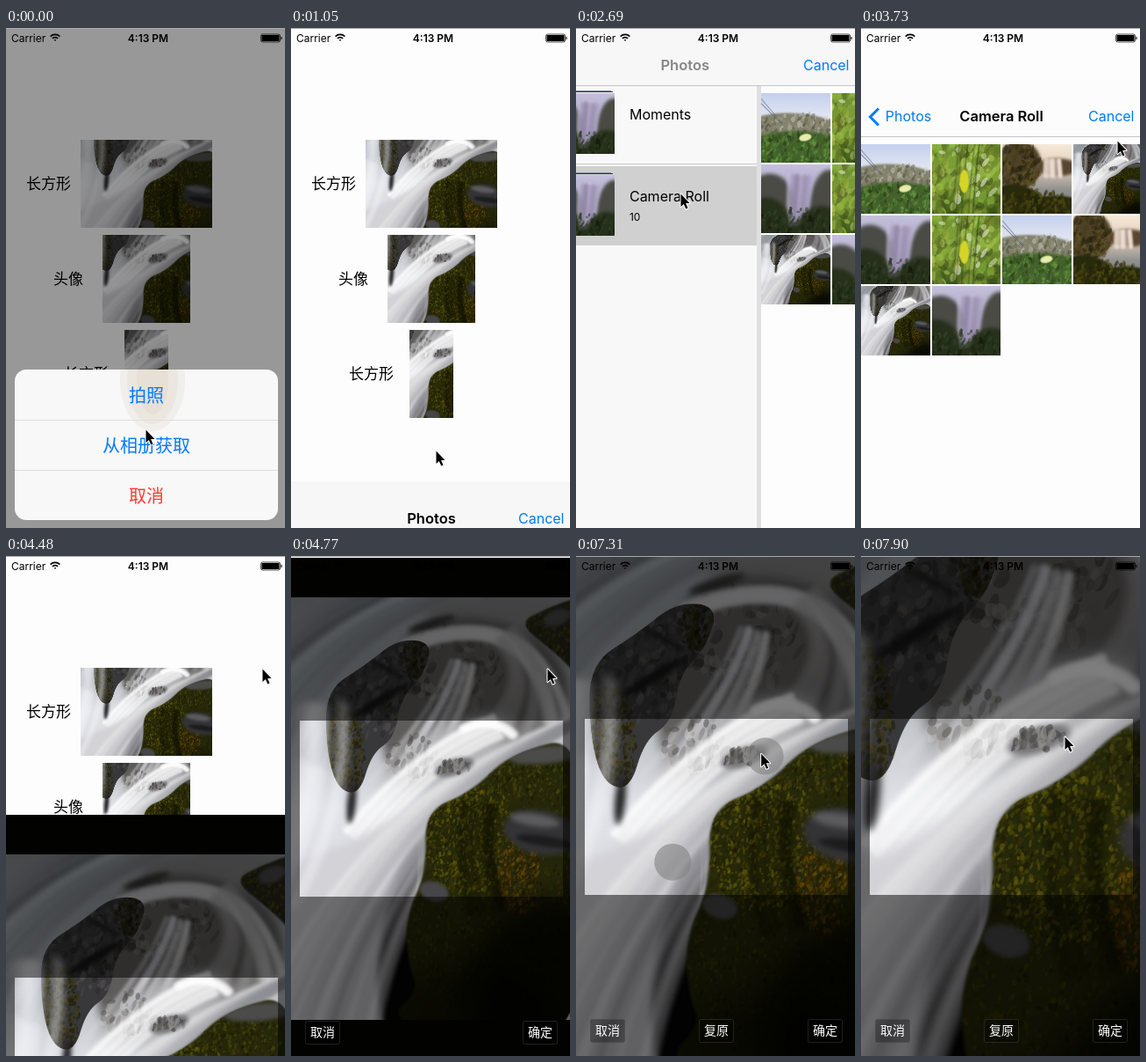
Write an HTML page with a canvas that moves like this. It is 318 by 568 pixels and loops after 8 s.

```html
<!DOCTYPE html>
<html lang="zh">
<head>
<meta charset="utf-8">
<style>
html, body { margin: 0; width: 100%; height: 100%; overflow: hidden; background: #fdfdfd; }
canvas { display: block; width: 318px; height: 568px; }
</style>
</head>
<body>
<canvas id="stage" width="318" height="568"></canvas>
<script>
const W = 318, H = 568, LOOP = 8000, BEAT = 149.2;
const ctx = document.getElementById('stage').getContext('2d');
const LATIN = 'Inter, "Open Sans", sans-serif';
const CJK = '"Noto Sans CJK SC", "Noto Sans CJK", sans-serif';
const BLUE = '#007aff', RED = '#ff3b30';

// ---------- painting ----------
function random(seed) {
  return () => (seed = seed * 16807 % 2147483647) / 2147483647;
}

// Soft brushes that share one seeded random source.
function brushes(g, seed) {
  const rnd = random(seed * 99991);
  const blurred = (blur, draw) => {
    g.filter = blur ? `blur(${blur}px)` : 'none';
    draw();
    g.filter = 'none';
  };
  const normal = (dx, dy) => [-dy / Math.hypot(dx, dy), dx / Math.hypot(dx, dy)];

  function backdrop(w, h, ...colors) {
    const fill = g.createLinearGradient(0, 0, 0, h);
    colors.forEach((c, i) => fill.addColorStop(i / (colors.length - 1), c));
    g.fillStyle = fill;
    g.fillRect(0, 0, w, h);
  }
  function oval(color, x, y, rx, ry, turn = 0, blur = 0) {
    g.fillStyle = color;
    g.beginPath();
    g.ellipse(x, y, rx, ry, turn, 0, 7);
    blurred(blur, () => g.fill());
  }
  // A smooth closed outline; details are clipped to it.
  function mass(color, points, blur, details) {
    g.save();
    g.beginPath();
    points.forEach(([x, y], i) => {
      const [nx, ny] = points[(i + 1) % points.length];
      if (!i) {
        const [px, py] = points[points.length - 1];
        g.moveTo((px + x) / 2, (py + y) / 2);
      }
      g.quadraticCurveTo(x, y, (x + nx) / 2, (y + ny) / 2);
    });
    g.fillStyle = color;
    blurred(blur, () => g.fill());
    if (details) {
      g.clip();
      details();
    }
    g.restore();
  }
  // Strands along a curve; the spread goes from s0 to s1.
  function flow(n, color, width, alpha, [x0, y0, cx, cy, x1, y1], s0, s1) {
    const [ax, ay] = normal(cx - x0, cy - y0), [bx, by] = normal(x1 - cx, y1 - cy);
    g.strokeStyle = color;
    g.lineCap = 'round';
    blurred(width * 0.6, () => {
      for (let i = 0; i < n; i++) {
        const k = rnd() * 2 - 1, m = k * (s0 + s1) / 4;
        g.globalAlpha = alpha * (0.4 + rnd() * 0.6);
        g.lineWidth = width * (0.3 + rnd());
        g.beginPath();
        g.moveTo(x0 + ax * k * s0, y0 + ay * k * s0);
        g.quadraticCurveTo(cx + (ax + bx) * m, cy + (ay + by) * m, x1 + bx * k * s1, y1 + by * k * s1);
        g.stroke();
      }
    });
    g.globalAlpha = 1;
  }
  function speckle(n, x, y, rx, ry, [hue, sat, light], size) {
    g.globalAlpha = 0.5;
    for (let i = 0; i < n; i++) {
      const a = rnd() * 2 * Math.PI, r = Math.sqrt(rnd());
      g.fillStyle = `hsl(${hue + rnd() * 10 - 5} ${sat}% ${light * (0.4 + rnd() * 1.2)}%)`;
      g.beginPath();
      g.ellipse(x + rx * r * Math.cos(a), y + ry * r * Math.sin(a),
        size * (0.3 + rnd() * 0.5), size * (0.4 + rnd()), rnd() - 0.2, 0, 7);
      g.fill();
    }
    g.globalAlpha = 1;
  }
  return { backdrop, oval, mass, flow, speckle };
}

function picture(w, h, seed, paint) {
  const c = document.createElement('canvas');
  c.width = w * 2;
  c.height = h * 2;
  const g = c.getContext('2d');
  g.scale(2, 2);
  paint(brushes(g, seed), g);
  return c;
}

const MOSS = [55, 80, 13], STONE = [30, 3, 24];

const rapids = picture(W, 480, 7, ({ backdrop, oval, mass, flow, speckle }, g) => {
  backdrop(W, 480, '#8e9297', '#a6abb0', '#e2e3e8', '#d8d8dc', '#c2c2c6');
  g.translate(0, -45);
  const spray = [210, 30, 60, 70, -20, 200];
  flow(26, '#62686e', 12, 0.3, spray, 40, 80);
  flow(16, '#c8ced4', 9, 0.3, spray, 30, 80);
  oval('#858585', 240, 62, 90, 22, 0, 14);

  mass('#5e5c5b', [[110, 110], [165, 62], [270, 75], [320, 130], [310, 200], [200, 235], [100, 265]], 10);
  speckle(110, 185, 125, 55, 50, [30, 3, 32], 7);
  oval('#343332', 160, 75, 28, 5, -0.3, 6);
  flow(26, '#cfd0d2', 8, 0.3, [130, 100, 275, 45, 305, 185], 5, 14);
  flow(20, '#a5a4a4', 9, 0.3, [245, 88, 290, 130, 255, 200], 16, 36);
  flow(22, '#dddde1', 6, 0.38, [195, 120, 180, 180, 110, 270], 14, 28);
  oval('#b9b9bc', 180, 222, 80, 30, -0.4, 16);
  speckle(50, 140, 225, 32, 24, [30, 2, 52], 6);
  flow(24, '#ffffff', 6, 0.4, [235, 192, 150, 225, 75, 320], 14, 18);
  flow(8, '#ffffff', 7, 0.6, [196, 195, 228, 178, 254, 202], 3, 4);

  mass('#38383a', [[40, 150], [85, 122], [122, 92], [162, 96], [150, 135], [125, 160], [118, 205], [92, 222], [78, 270], [52, 262], [40, 215]], 0, () => {
    speckle(260, 95, 150, 60, 55, STONE, 5);
    speckle(420, 60, 225, 24, 55, [53, 80, 10], 2.5);
    speckle(120, 142, 115, 18, 22, [55, 60, 8], 3);
    oval('#151516', 100, 163, 36, 5, -0.55, 5);
    oval('#1d1d1d', 112, 128, 22, 3, 0.5, 4);
  });
  oval('#242426', 69, 278, 5, 24, 0.1, 6);

  oval('#040404', 145, 430, 48, 135, 0.1, 8);
  flow(6, '#8d8d92', 2, 0.6, [146, 312, 150, 345, 144, 380], 4, 3);
  mass('#d2d2d7', [[340, 172], [270, 215], [160, 268], [70, 325], [-40, 360], [-40, 570], [95, 570], [98, 440], [125, 345], [190, 282], [260, 228]], 9);
  const stream = [322, 188, 110, 285, 30, 540];
  flow(34, '#ffffff', 9, 0.32, stream, 3, 68);
  flow(28, '#8d8d94', 9, 0.26, stream, 3, 72);
  flow(12, '#f6f6fa', 14, 0.4, [32, 170, 40, 280, -20, 380], 30, 30);
  oval('#77777a', 186, 238, 23, 9, -0.3, 5);
  speckle(50, 186, 238, 20, 7, [30, 3, 40], 4);

  mass('#25270a', [[340, 200], [250, 222], [206, 266], [152, 288], [155, 355], [130, 410], [134, 465], [146, 490], [110, 525], [200, 550], [340, 550]], 2, () => {
    speckle(1700, 230, 370, 105, 165, [54, 80, 10], 2.4);
    speckle(900, 200, 315, 55, 68, [57, 80, 16], 2.2);
    speckle(260, 270, 250, 48, 24, [58, 65, 13], 2.4);
    speckle(320, 260, 360, 25, 45, [40, 88, 18], 2.4);
    flow(9, '#0c0d03', 6, 0.5, [215, 280, 205, 330, 225, 400], 28, 32);
    oval('#4b4b49', 290, 224, 42, 10, -0.1, 4);
    oval('#343436', 284, 312, 42, 25, 0.2, 6);
    oval('#5c5c5f', 278, 298, 28, 7, 0.15, 6);
    oval('#1c1c1d', 290, 322, 34, 6, 0.15, 5);
    oval('#464649', 163, 379, 17, 11, 0.3, 3);
    oval('rgba(0,0,0,.75)', 300, 490, 100, 105, 0.5, 40);
    oval('rgba(0,0,0,.5)', 200, 530, 100, 70, 0, 40);
  });

  mass('#26261c', [[258, 75], [290, 58], [340, 40], [340, 150], [305, 110]], 2, () => {
    speckle(160, 295, 90, 35, 45, MOSS, 3);
    oval('#48484a', 303, 68, 16, 9, -0.4, 4);
  });
});

const meadow = picture(78, 78, 11, ({ backdrop, oval, flow, speckle }) => {
  backdrop(78, 78, '#c5d0ee', '#eff0f4', '#f2f2f2');
  oval('#84836f', 42, 52, 68, 29, 0.1, 2);
  speckle(160, 42, 38, 50, 14, [60, 12, 50], 3);
  oval('#44612c', 40, 75, 75, 32, 0, 3);
  speckle(420, 40, 66, 60, 22, [95, 42, 30], 3);
  flow(2, '#555b63', 0.8, 1, [0, 6, 12, 20, 24, 34], 4, 1);
  oval('#e6edab', 50, 50, 7, 4, -0.2, 1);
});

const leaves = picture(78, 78, 29, ({ backdrop, oval, flow, speckle }) => {
  backdrop(78, 78, '#6d8b2d', '#819f36', '#3d5a18');
  speckle(220, 39, 39, 56, 56, [78, 50, 38], 8);
  speckle(60, 39, 39, 56, 56, [70, 50, 65], 5);
  flow(5, '#2d4017', 2, 0.9, [46, -5, 40, 40, 38, 83], 14, 14);
  oval('#d6d426', 37, 42, 5, 13, 0, 1);
});

const lake = picture(78, 78, 41, ({ backdrop, oval, flow, speckle }) => {
  backdrop(78, 78, '#f7ead9', '#e1cfbd', '#8f8f8d', '#77777b');
  oval('#4d4228', 18, 24, 26, 28, 0.3, 3);
  oval('#5a4630', 62, 26, 24, 10, 0, 3);
  speckle(170, 18, 24, 26, 26, [45, 45, 19], 4);
  flow(20, '#f7e8dc', 4, 0.7, [54, 18, 54, 26, 54, 36], 13, 15);
  oval('#282a0c', 15, 76, 40, 30, 0.2, 2);
  oval('#282a0c', 60, 78, 40, 20, 0, 2);
  speckle(260, 35, 72, 46, 20, [55, 60, 15], 3);
});

const cascade = picture(78, 78, 53, ({ backdrop, oval, flow, speckle }) => {
  backdrop(78, 78, '#c6c2dc', '#a9a3c0', '#6f667f');
  oval('#4a4b45', 10, 40, 26, 29, 0, 4);
  oval('#4a4b45', 72, 38, 16, 32, 0.2, 4);
  flow(26, '#cdc5de', 6, 0.4, [44, 12, 42, 35, 40, 58], 14, 11);
  flow(12, '#81769a', 5, 0.35, [44, 14, 42, 35, 40, 60], 15, 12);
  oval('#26301a', 5, 64, 27, 26, 0.4, 4);
  oval('#26301a', 66, 70, 25, 22, -0.4, 4);
  oval('#26301a', 38, 84, 50, 16, 0, 4);
  speckle(240, 39, 72, 50, 22, [90, 30, 14], 3);
});

// ---------- motion ----------
// Critically damped spring from 0 to 1, in beats.
function spring(b, start) {
  const x = 3 * Math.max(0, b - start);
  return 1 - (1 + x) * Math.exp(-x);
}
const ramp = (b, start, end) => Math.min(1, Math.max(0, (b - start) / (end - start)));

const TRIPS = [
  { from: 0, to: 2, x: 164, y: 479 },
  { from: 10, to: 14, x: 118, y: 187 },
  { from: 18, to: 21, x: 291, y: 127 },
  { from: 34, to: 38, x: 199, y: 233 },
  { from: 47, to: 53, x: 231, y: 204 }
];
function pointerAt(b) {
  let x = 158, y = 455;
  for (const trip of TRIPS) {
    const k = ramp(b, trip.from, trip.to);
    x += (trip.x - x) * k;
    y += (trip.y - y) * k;
  }
  return [x, y];
}

// ---------- interface ----------
function rect(color, x, y, w, h) {
  ctx.fillStyle = color;
  ctx.fillRect(x, y, w, h);
}
function disc(color, x, y, rx, ry = rx) {
  ctx.fillStyle = color;
  ctx.beginPath();
  ctx.ellipse(x, y, rx, ry, 0, 0, 7);
  ctx.fill();
}
function label(s, x, y, size, { color = '#000', align = 'left', weight = 400, family = LATIN, alpha = 1 } = {}) {
  ctx.globalAlpha = Math.max(0, alpha);
  ctx.font = `${weight} ${size}px ${family}`;
  ctx.fillStyle = color;
  ctx.textAlign = align;
  ctx.textBaseline = 'middle';
  ctx.fillText(s, x, y);
  ctx.globalAlpha = 1;
}
function shifted(x, y, draw) {
  ctx.save();
  ctx.translate(x, y);
  draw();
  ctx.restore();
}

function mainPage() {
  rect('#fdfdfd', 0, 0, W, H);
  [['长方形', 23, 150], ['头像', 54, 100], ['长方形', 66, 50]].forEach(([name, x, w], i) => {
    const y = 127 + i * 108;
    label(name, x, y + 50, 17, { family: CJK });
    ctx.drawImage(rapids, (160 - w) * 2, 280, w * 4, 400, 160 - w / 2, y, w, 100);
  });
}

function actionSheet(b) {
  const gone = spring(b, 3.6);
  rect(`rgba(0,0,0,${0.4 * (1 - gone)})`, 0, 0, W, H);
  shifted(0, gone * 185, () => {
    ctx.beginPath();
    ctx.roundRect(10, 388, 300, 171, 13);
    ctx.clip();
    rect('#f8f8f8', 10, 388, 300, 171);
    for (const r of [37, 29, 18]) disc('rgba(190,180,150,.13)', 167, 400, r, r + 21);
    if (b === 2 || b === 3) rect('rgba(0,0,0,.08)', 10, 445, 300, 57);
    ['拍照', '从相册获取', '取消'].forEach((s, i) => {
      const y = 388 + i * 57;
      if (i) rect('#dededf', 10, y, 300, 1);
      label(s, 160, y + 29, 20, { color: i < 2 ? BLUE : RED, align: 'center', family: CJK });
    });
  });
}

function albumList(selected) {
  rect('#f8f8f8', 0, 0, W, H);
  if (selected) rect('#d0d0d0', 0, 157, W, 90);
  rect('#c8c8cc', 0, 154, W, 1);
  ['Moments', 'Camera Roll'].forEach((name, i) => {
    const y = 74 + i * 93;
    rect('#7d8b9c', 12, y - 3, 60, 1);
    rect('#27343c', 10, y - 2, 64, 1);
    ctx.drawImage(cascade, 8, y, 68, 69);
    label(name, 93, y + 25.5, 16);
  });
  label('10', 93, 215, 12);
}

function photoGrid() {
  const roll = [meadow, leaves, lake, rapids, cascade, leaves];
  rect('#fdfdfd', 0, 0, W, H);
  for (let i = 0; i < 10; i++) {
    const pic = i < 6 ? roll[i] : roll[(i - 6) % 5 + (i > 6 ? 1 : 0)];
    const shown = i === 9 ? cascade : pic;
    const size = shown.width, x = i % 4 * 80.5, y = 74 + Math.floor(i / 4) * 80.5;
    ctx.drawImage(shown, 0, (shown.height - size) / 2, size, size, x, y, 78.5, 78.5);
  }
}

function navBar(p) {
  const late = Math.max(0, 2 * p - 1), tone = 247 + 5 * late;
  const bold = { align: 'center', weight: 600 };
  const titleX = 160 - p * 106;
  rect(`rgb(${tone} ${tone} ${tone})`, 0, 0, W, 65);
  rect('#c4c4c8', 0, 65, W, 1);
  label('Photos', titleX, 43, 16.5, { ...bold, alpha: 1 - 1.6 * p });
  label('Photos', titleX, 43, 16, { color: BLUE, align: 'center', alpha: late });
  label('Camera Roll', 160 + (1 - p) * 110, 43, 16.5, { ...bold, alpha: late });
  label('Cancel', 259, 43, 16, { color: BLUE });
  ctx.globalAlpha = late;
  ctx.strokeStyle = BLUE;
  ctx.lineWidth = 3;
  ctx.beginPath();
  ctx.moveTo(20, 33.5);
  ctx.lineTo(10.5, 43);
  ctx.lineTo(20, 52.5);
  ctx.stroke();
  ctx.globalAlpha = 1;
}

function picker(b) {
  const top = Math.round(H * (1 - spring(b, 6.83) + spring(b, 24.82)));
  const push = spring(b, 17.6), x = Math.round(W * (1 - push));
  shifted(0, top, () => {
    if (x > 0) shifted(-push * 95, 0, () => albumList(b >= 15));
    if (push > 0) {
      if (x > 0) rect('#dfdfe0', x - 5, 65, 5, H);
      shifted(x, 0, photoGrid);
    }
    navBar(push);
  });
}

function button(s, x) {
  ctx.beginPath();
  ctx.roundRect(x - 19.5, 526.5, 39, 26, 2);
  ctx.fillStyle = 'rgba(0,0,0,.3)';
  ctx.fill();
  ctx.strokeStyle = 'rgba(70,70,70,.45)';
  ctx.lineWidth = 1;
  ctx.stroke();
  label(s, x, 539, 14, { color: '#fff', align: 'center', family: CJK });
}

function cropper(b) {
  const top = Math.round(H * (1 - spring(b, 29.459)));
  const zoom = 1 + 0.62 * ramp(b, 47, 53);
  shifted(0, top, () => {
    rect('#040402', 0, 0, W, H);
    ctx.drawImage(rapids, 159 - 159 * zoom, 285 - 240 * zoom, W * zoom, 480 * zoom);
    ctx.beginPath();
    ctx.rect(0, 0, W, H);
    ctx.rect(10, 185, 300, 200);
    ctx.fillStyle = 'rgba(0,0,0,.5)';
    ctx.fill('evenodd');
    button('取消', 36);
    if (zoom > 1) button('复原', 160);
    button('确定', 284);
  });
}

function statusBar() {
  rect('#a9a9a9', 0, 0, W, 1);
  label('Carrier', 6, 12, 12);
  label('4:13 PM', 162, 12, 12, { align: 'center', weight: 600 });
  ctx.strokeStyle = '#000';
  ctx.lineWidth = 1.6;
  for (const r of [1, 4.4, 7.6]) {
    ctx.beginPath();
    ctx.arc(56, 15, r, -Math.PI * 0.75, -Math.PI * 0.25);
    ctx.stroke();
  }
  ctx.lineWidth = 0.7;
  ctx.beginPath();
  ctx.roundRect(290.5, 7, 22, 9, 2);
  ctx.stroke();
  rect('#000', 291.5, 8, 20, 7);
  rect('#000', 313.5, 10, 1, 3);
}

function pointer(b) {
  const [x, y] = pointerAt(b);
  if (b >= 44 && b < 53) {
    const color = b < 46 ? 'rgba(170,170,170,.5)' : 'rgba(130,130,130,.6)';
    disc(color, x + 6, y + 4, 21);
    disc(color, 320 - x, 571 - y, 21);
  }
  shifted(x + 0.5, y + 0.5, () => {
    const arrow = new Path2D('M1 1V15.5L4.3 12.4L6.8 18L9 17L6.6 11.5H11Z');
    ctx.lineJoin = 'round';
    ctx.lineWidth = 2;
    ctx.strokeStyle = '#fff';
    ctx.stroke(arrow);
    ctx.fillStyle = '#000';
    ctx.fill(arrow);
  });
}

function frame() {
  const b = Math.floor((performance.now() % LOOP + 8) / BEAT);
  mainPage();
  if (b < 7) actionSheet(b);
  if (b >= 7 && b < 27) picker(b);
  if (b >= 30) cropper(b);
  statusBar();
  pointer(b);
  requestAnimationFrame(frame);
}
frame();
</script>
</body>
</html>
```
